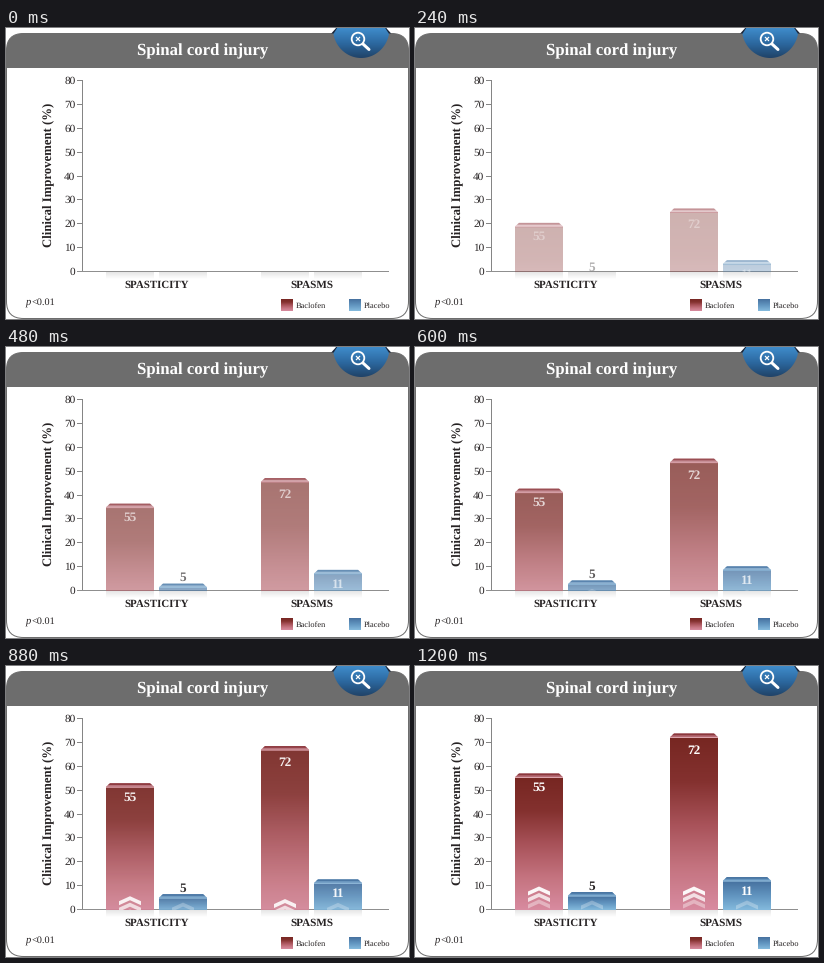
A matplotlib script for the animation above (6000 ms loop, 403 by 291 pixels).

```python
import numpy as np
import matplotlib.pyplot as plt
from matplotlib.animation import FuncAnimation
from matplotlib.colors import LinearSegmentedColormap
from matplotlib.patches import Circle, FancyBboxPatch, Polygon, Rectangle
from matplotlib.transforms import Affine2D

W, H, DPI = 403, 291, 64
PX = 72 / DPI
STEP, LOOP, RISE = 40, 6000, 1200
BASE = 244
INK, GREY = "#262223", "#6d6d6d"
RED = ["#772722", "#84312f", "#a85259", "#c4737f", "#d88ba0"]
BLUE = ["#46719f", "#6194bf", "#84badd"]

plt.rcParams["font.family"] = "Liberation Serif"
plt.rcParams["text.hinting"] = "none"

fig = plt.figure(figsize=(W / DPI, H / DPI), dpi=DPI, facecolor="white")
ax = fig.add_axes([0, 0, 1, 1])
ax.axis("off")


def add(patch, **kw):
    patch.set(snap=False, **kw)
    return ax.add_patch(patch)


def gradient(x0, y0, x1, y1, colors, z=2, **kw):
    ramp = np.linspace(0, 1, 256)[:, None]
    cmap = LinearSegmentedColormap.from_list("ramp", colors)
    return ax.imshow(ramp, cmap=cmap, extent=(x0, x1, y1, y0), aspect="auto",
                     origin="upper", zorder=z, **kw)


def text(x, y, s, size, color=INK, ha="center", z=6, **kw):
    return ax.text(x, y, s, fontsize=size * PX, color=color, ha=ha,
                   va=kw.pop("va", "baseline"), zorder=z, **kw)


def line(xs, ys, color, width=1, z=2, cap="butt"):
    ax.plot(xs, ys, color=color, lw=width * PX, zorder=z, snap=False,
            solid_capstyle=cap)


def draw_panel():
    shape = dict(boxstyle="round,pad=0,rounding_size=17")
    body = add(FancyBboxPatch((0.5, 5.5), W - 1, H - 6, **shape),
               fc="white", ec=GREY, lw=PX, zorder=0)
    header = add(Rectangle((0, 5), W, 35), fc=GREY, ec="none", zorder=1)
    header.set_clip_path(body)
    text(197, 27, "Spinal cord injury", 16.8, "white", weight="bold")


def draw_badge():
    cx, r = 355.2, 28.3
    a = np.linspace(np.arcsin(5 / r), np.pi - np.arcsin(5 / r), 60)
    arc = np.column_stack([cx + r * np.cos(a), 0.5 + 29.5 * np.sin(a)])
    outline = np.vstack([[(cx - 25, 0), (cx + 25, 0)], arc])
    disc = add(Polygon(outline), fc="none", ec="none")
    blue = gradient(325, 0, 386, 31, ["#3f8ccb", "#2c689f", "#1f4064"], z=3)
    blue.set_clip_path(disc)
    for s in (-1, 1):
        ear = [(cx + s * dx, y) for dx, y in ((30, 5.5), (25, 0), (24, 0), (27.5, 5.5))]
        add(Polygon(ear), fc="#16243a", ec="none", zorder=4)
    add(Circle((352, 11), 6.3), fc="none", ec="white", lw=1.8 * PX, zorder=5)
    for s in (-1, 1):
        line([350, 354], [11 - 2 * s, 11 + 2 * s], "white", 1.2, 5)
    line([357, 363], [16, 21.5], "white", 3, 5, "round")


def draw_axes():
    line([76.5, 76.5], [52, BASE], "#858585")
    line([71, 383], [243.5, 243.5], "#8f8f8f")
    for k in range(9):
        y = round(243 - 23.875 * k) + 0.5
        if k:
            line([71, 76], [y, y], "#858585")
        text(69.5, y + 3.5, str(10 * k), 11.2, ha="right")
    text(42.5, 146.5, "Clinical Improvement (%)", 12.7, weight="bold",
         rotation=90, va="center")
    text(150.8, 259.5, "SPASTICITY", 10.9, weight="bold")
    text(305.5, 259.5, "SPASMS", 11.1, weight="bold")
    for x in (100, 153, 255, 308):
        gradient(x, 244, x + 48, 251, ["#e6e6e6", "#ffffff"], z=1)


def draw_legend():
    text(20, 276.4, "p", 10.5, ha="left", style="italic")
    text(25.2, 276.4, "<0.01", 10.3, ha="left")
    for x, colors, name in ((275, RED, "Baclofen"), (343, BLUE, "Placebo")):
        gradient(x, 271, x + 12, 283, colors)
        text(x + 14.5, 280, name, 8.4, ha="left")


class Bar:
    """A bar that slides up from behind the baseline while fading in."""

    def __init__(self, x, top, travel, colors, cap, label, label_y, label_color, chevrons):
        self.travel = travel
        self.shift = Affine2D()
        self.parts = []
        move = self.shift + ax.transData
        mid = x + 24
        edge, face, lip = cap

        self.keep(gradient(x, top + 4.5, x + 48, BASE, colors, z=3, transform=move))
        slab = [(x + 4, top), (x + 44, top), (x + 48, top + 3.5),
                (x + 48, top + 4.5), (x, top + 4.5), (x, top + 3.5)]
        self.keep(add(Polygon(slab), fc=face, ec="none", zorder=4, transform=move))
        rim = [(x + 4, top), (x + 44, top), (x + 46, top + 1.8), (x + 2, top + 1.8)]
        self.keep(add(Polygon(rim), fc=edge, ec="none", zorder=4, transform=move))
        self.keep(add(Rectangle((x, top + 3.5), 48, 1), fc=lip, ec="none",
                      zorder=4, transform=move))
        for y, alpha in chevrons:
            pts = [(0, 0), (11, 5), (11, 9), (0, 4), (-11, 9), (-11, 5)]
            self.keep(add(Polygon([(mid + dx, y + dy) for dx, dy in pts]),
                          fc="white", ec="none", zorder=5, transform=move), alpha)
        self.keep(text(mid, label_y, label, 13.3, label_color, weight="bold",
                       transform=move))

    def keep(self, artist, alpha=1):
        artist.set_clip_on(True)
        artist.set_clip_path(window)
        self.parts.append((artist, alpha))

    def pose(self, e):
        self.shift.clear().translate(0, self.travel * (1 - e))
        for artist, alpha in self.parts:
            artist.set_alpha(alpha * e)


draw_panel()
draw_badge()
draw_axes()
draw_legend()

window = add(Rectangle((0, 41), W, BASE - 41), fc="none", ec="none")
red_cap = ("#8c383d", "#b56b74", "#dda5ad")
blue_cap = ("#4a76a3", "#6595bf", "#97bfdd")
triple = [(220.5, 0.95), (227, 0.75), (233.5, 0.38)]
single = [(234.5, 0.28)]
bars = [
    Bar(100, 107.5, 136.5, RED, red_cap, "55", 125, "white", triple),
    Bar(153, 226, 29.5, BLUE, blue_cap, "5", 223.5, INK, single),
    Bar(255, 67.5, 176.5, RED, red_cap, "72", 87.5, "white", triple),
    Bar(308, 211, 33, BLUE, blue_cap, "11", 229, "white", single),
]

ax.set_xlim(0, W)
ax.set_ylim(H, 0)


def update(i):
    t = min(i * STEP / RISE, 1) if i > 1 else 0
    e = 1 - (1 - t) ** 2
    for bar in bars:
        bar.pose(e)
    return []


anim = FuncAnimation(fig, update, frames=LOOP // STEP, interval=STEP,
                     init_func=lambda: update(0), repeat=True, repeat_delay=0)
plt.show()
```
